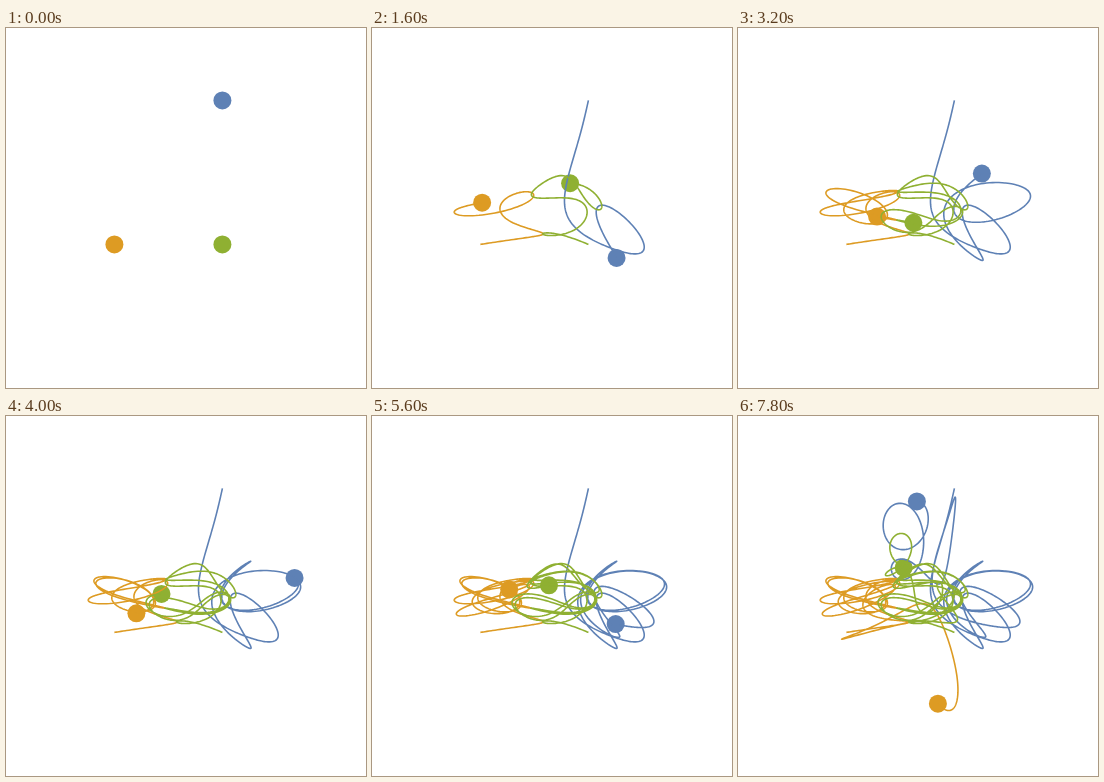
An HTML page with a canvas for the animation above (8 s loop, 360x360 px).

```html
<!DOCTYPE html>
<html lang="en">
<head>
<meta charset="utf-8">
<title>Three bodies</title>
<style>
  html, body { margin: 0; height: 100%; overflow: hidden; background: #fff; }
  canvas { display: block; }
</style>
</head>
<body>
<canvas id="stage" width="360" height="360"></canvas>
<script>
const FRAME_MS = 200, FRAMES = 40;
const SCALE = 36, CENTER = 180.4, RADIUS = 9;
const MASSES = [3, 4, 5];
const COLORS = ['#5e81b5', '#dd9b23', '#8fb032'];
const PAIRS = [[0, 1], [0, 2], [1, 2]];
const LEVELS = 6;

const distance = (s, a, b) => Math.hypot(s[2 * b] - s[2 * a], s[2 * b + 1] - s[2 * a + 1]);
const addScaled = (a, b, k) => a.map((v, i) => v + k * b[i]);

// State: three positions followed by three velocities. Gravity with G = 1.
function derivative(s) {
  const d = new Float64Array(12);
  for (let i = 0; i < 6; i++) d[i] = s[i + 6];
  for (const [a, b] of PAIRS) {
    const cube = distance(s, a, b) ** 3;
    for (let axis = 0; axis < 2; axis++) {
      const pull = (s[2 * b + axis] - s[2 * a + axis]) / cube;
      d[6 + 2 * a + axis] += MASSES[b] * pull;
      d[6 + 2 * b + axis] -= MASSES[a] * pull;
    }
  }
  return d;
}

function midpoint(state, h, n) {
  const sub = h / n;
  let before = state, now = addScaled(state, derivative(state), sub);
  for (let i = 1; i < n; i++) {
    [before, now] = [now, addScaled(before, derivative(now), 2 * sub)];
  }
  const slope = derivative(now);
  return now.map((v, i) => (v + before[i] + sub * slope[i]) / 2);
}

// Extrapolated midpoint rule: close encounters need a very high order.
function step(state, h) {
  let previous = [];
  for (let k = 1; k <= LEVELS; k++) {
    const row = [midpoint(state, h, 2 * k)];
    for (let j = 1; j < k; j++) {
      const gain = 1 / ((k / (k - j)) ** 2 - 1);
      const best = row[j - 1], coarse = previous[j - 1];
      row.push(best.map((v, i) => v + (v - coarse[i]) * gain));
    }
    previous = row;
  }
  return previous[LEVELS - 1];
}

// Bodies start at rest on the corners of a 3-4-5 triangle.
let state = Float64Array.of(1, 3, -2, -1, 1, -1, 0, 0, 0, 0, 0, 0);
const path = [state], ends = [0];
for (let t = 0, frame = 1; frame < FRAMES; frame++) {
  while (t < frame) {
    const nearest = Math.min(...PAIRS.map(([a, b]) => distance(state, a, b)));
    const h = 0.025 * nearest ** 1.5;
    const last = t + h >= frame;
    state = step(state, last ? frame - t : h);
    t = last ? frame : t + h;
    path.push(state);
  }
  ends.push(path.length - 1);
}

const ctx = document.getElementById('stage').getContext('2d');
ctx.lineWidth = 1.6;
ctx.lineJoin = 'round';
const screenX = (s, body) => CENTER + SCALE * s[2 * body];
const screenY = (s, body) => CENTER - SCALE * s[2 * body + 1];

function draw(frame) {
  const end = ends[frame];
  ctx.fillStyle = '#fff';
  ctx.fillRect(0, 0, 360, 360);
  COLORS.forEach((color, body) => {
    ctx.fillStyle = color;
    ctx.beginPath();
    ctx.arc(screenX(path[end], body), screenY(path[end], body), RADIUS, 0, 2 * Math.PI);
    ctx.fill();
  });
  if (!end) return;
  COLORS.forEach((color, body) => {
    ctx.strokeStyle = color;
    ctx.beginPath();
    for (let i = 0; i <= end; i++) ctx.lineTo(screenX(path[i], body), screenY(path[i], body));
    ctx.stroke();
  });
}

let shown = -1;
const start = performance.now();
function tick() {
  const frame = Math.floor((performance.now() - start) / FRAME_MS) % FRAMES;
  if (frame !== shown) draw(shown = frame);
  requestAnimationFrame(tick);
}
tick();
</script>
</body>
</html>
```
